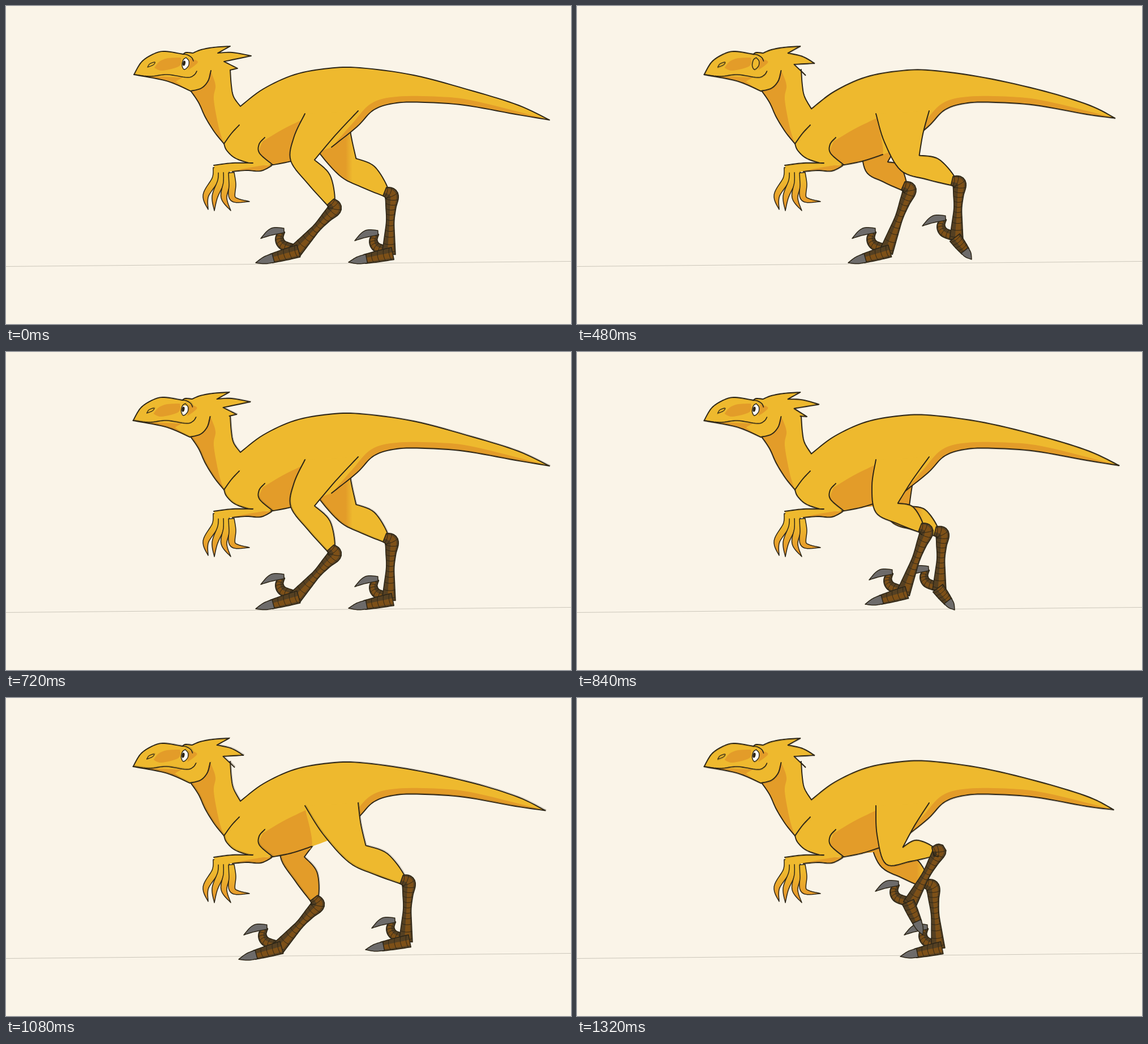
An HTML page with a canvas for the animation above (1.44 s loop, 998x561 px).

```html
<!DOCTYPE html>
<html lang="en">
<head>
<meta charset="utf-8">
<title>Walking raptor</title>
<style>
html, body { margin: 0; width: 100%; height: 100%; overflow: hidden; background: #faf4e8; }
canvas { display: block; width: 100vw; height: 100vh; }
</style>
</head>
<body>
<canvas id="stage" width="998" height="561"></canvas>
<script>
const ctx = document.getElementById('stage').getContext('2d');
const PAPER = '#faf4e8', SKIN = '#eeb92e', SHADE = '#e39c29', INK = '#2c2517';
const BARK = '#554022', RUST = '#7d5018', CLAW = '#6d6b6a';

let tick = 0;

const parse = s => s.trim().split(/\s+/).map(p => p.split(',').map(Number));
const mix = (a, b, t) => a.map((v, i) => v + (b[i] - v) * t);
const add = (a, b, k = 1) => [a[0] + b[0] * k, a[1] + b[1] * k];
const unit = (a, b) => {
  const d = add(b, a, -1), l = Math.hypot(...d) || 1;
  return [d[0] / l, d[1] / l];
};
const clamp = v => Math.max(0, Math.min(1, v));

// Catmull-Rom point between p[i] and p[i + 1].
function spline(p, i, t) {
  const a = p[i - 1] || p[i], b = p[i], c = p[i + 1], d = p[i + 2] || c;
  return b.map((v, n) => v + 0.5 * t * (c[n] - a[n] +
    t * (2 * a[n] - 5 * v + 4 * c[n] - d[n] + t * (3 * (v - c[n]) + d[n] - a[n]))));
}

function sample(p, steps = 8) {
  const out = [p[0]];
  for (let i = 0; i < p.length - 1; i++)
    for (let j = 1; j <= steps; j++) out.push(spline(p, i, j / steps));
  return out;
}

// Smooth runs joined by corners; in text a "|" marks the corner.
function curve(shape) {
  const runs = typeof shape === 'string' ? shape.split('|').map(parse) : shape;
  const path = new Path2D();
  let last;
  for (const run of runs) {
    const p = last ? [last, ...run] : run;
    sample(p).forEach(q => path.lineTo(...q));
    last = p[p.length - 1];
  }
  return path;
}

function paint(shape, color) {
  ctx.fillStyle = color;
  ctx.fill(curve(shape));
}

// Pen line plus a faint second pass that wanders from drawing to drawing.
function ink(shape, width = 1.9) {
  const path = curve(shape);
  ctx.strokeStyle = INK;
  ctx.lineWidth = width;
  ctx.stroke(path);
  if (!tick) return;
  ctx.save();
  ctx.globalAlpha = 0.4;
  ctx.lineWidth = 0.6;
  ctx.translate(1.6 * Math.sin(tick * 2.3), 1.6 * Math.cos(tick * 1.7));
  ctx.stroke(path);
  ctx.restore();
}

// Tapering limb along [x, y, radius] knots, optionally with scales.
function tube(knots, color, scaly) {
  const line = sample(knots);
  const dir = line.map((p, i) => unit(line[Math.max(0, i - 1)], line[Math.min(line.length - 1, i + 1)]));
  const side = (i, k) => add(line[i], [-dir[i][1], dir[i][0]], line[i][2] * k);
  const ribbon = (from, to) => {
    const path = new Path2D();
    line.forEach((p, i) => path.lineTo(...side(i, from)));
    for (let i = line.length - 1; i >= 0; i--) path.lineTo(...side(i, to));
    path.closePath();
    return path;
  };
  ctx.fillStyle = color;
  ctx.fill(ribbon(-1, 1));
  ctx.strokeStyle = INK;
  if (scaly) {
    ctx.fillStyle = RUST;
    ctx.fill(ribbon(-0.7, 0.2));
    ctx.lineWidth = 0.9;
    for (let i = 2; i < line.length - 1; i += 3) {
      ctx.beginPath();
      ctx.moveTo(...side(i, -1));
      ctx.quadraticCurveTo(...add(line[i], dir[i], 4), ...side(i, 1));
      ctx.stroke();
    }
  }
  ctx.lineWidth = 1.5;
  ctx.stroke(ribbon(-1, 1));
}

// One stride: knee, ankle, ball of the foot, toe tip.
const GAIT = [
  '503,273 582,355 510,434 441,453',
  '528,283 618,314 576,426 509,445',
  '553,287 658,324 668,434 601,448',
  '606,290 711,324 706,430 635,444',
  '572,290 675,311 670,412 697,447',
  '546,293 641,268 587,365 611,418'
].map(parse);

function shin(ankle, ball, toe, knee) {
  const along = (a, b, ...knots) => knots.map(([t, r]) => [...mix(a, b, t), r]);
  const root = add(ball, [-4, -6]);
  const curl = (...knots) => knots.map(([x, y, r]) => [...add(root, [x, y]), r]);
  const cuff = [...add(ankle, unit(ankle, knee), 13), 8];

  tube(curl([0, 0, 8], [-18, -7, 8], [-23, -19, 7], [-17, -31, 4]), BARK, true);
  tube(curl([-15, -32, 4], [-36, -30, 6], [-56, -18, 0]), CLAW);
  tube([cuff, ...along(ankle, ball, [0.02, 12], [0.22, 9], [0.45, 7], [0.7, 9], [1, 12])], BARK, true);
  tube(along(ball, toe, [-0.1, 11], [0.25, 10], [0.6, 8]), BARK, true);
  tube(along(ball, toe, [0.55, 8], [0.78, 6], [1, 0]), CLAW);
}

// Thigh and calf follow from hip, knee and ankle; the crook lies on the knee's bisector.
function leg(pose, far) {
  const row = GAIT[(pose + (far ? 3 : 0)) % 6];
  const [knee, ankle, ball, toe] = far
    ? row.map((p, i) => add(p, [i ? -30 : -18, 8])) : row;
  const hip = [far ? 554 : 572, 190];
  const up = unit(knee, hip), down = unit(knee, ankle);
  const crook = add(knee, unit([0, 0], add(up, down)), 42);
  const end = add(ankle, down, -10), n = [-down[1] * 8, down[0] * 8];
  const front = add(hip, [-44, 0]), rear = add(hip, [50, -5]);
  const low = add(end, n), high = add(end, n, -1);
  const shape = [
    [front, add(mix(front, knee, 0.5), [-7, 0]), knee, add(mix(knee, low, 0.5), n, 0.3), low],
    [high, add(mix(high, crook, 0.5), n, -1.6), crook],
    [add(mix(crook, rear, 0.5), [-2, 0]), rear]
  ];
  let color = SKIN;
  if (far) {
    color = ctx.createLinearGradient(600, 0, 612, 0);
    color.addColorStop(0, SHADE);
    color.addColorStop(1, SKIN);
  }
  paint(shape, color);
  ink(shape);
  shin(ankle, ball, toe, knee);
}

function torso(pose) {
  const sag = 5 * Math.sin(Math.PI * pose / 6);
  const tip = `${960 - 2.4 * pose},${201 - 0.8 * pose}`;
  const nape = `396,112 398,140 402,160 414,${177 + sag}`;
  const back = parse('455,146 510,121 570,110 625,109 720,122')
    .map(([x, y]) => `${x},${y + sag}`).join(' ') + ' 825,150 905,175 ' + tip;
  const under = '900,191 810,175 740,170 690,171 650,183 620,213 575,249';
  const belly = '540,262 503,274 467,281';
  const throat = '325,148 340,170 352,196 368,222 385,243';
  const chest = '385,243 390,255 406,269 436,279';

  paint(`${nape}|${back}|${under}|${belly}|${chest.split(' ').reverse().join(' ')}|368,222 352,196 340,170 325,148|345,110`, SKIN);
  paint(`${throat}|376,215 367,165 370,140 362,116`, SHADE);
  paint(`${tip} 830,168 765,160 690,160 645,172 612,207 577,247|620,213 650,183 690,171 740,170 810,175 900,191`, SHADE);
  paint('470,279 448,260 453,239|490,217 529,198|540,262 505,274', SHADE);
  ink(`${nape}|${back}|${under}`);
  [belly, throat, chest, '385,243 398,225 412,210', '457,232 447,244 448,260 471,280'].forEach(s => ink(s));
}

function arm() {
  const tone = ctx.createLinearGradient(0, 305, 0, 355);
  tone.addColorStop(0, SKIN);
  tone.addColorStop(1, '#e5952a');
  parse('357,359 368,361 397,361 430,345').forEach((tip, i) => tube([
    [371 + 9 * i, 285 + 3 * i, 5], [370 + 10 * i, 305 + 3 * i, 6],
    [353 + 16 * i, 334 + 2 * i, 5], [...tip, 0]
  ], tone));
  const top = '436,277 400,277 367,281', bottom = '400,292 425,290 450,291 469,282';
  paint(`${top}|371,294|${bottom}`, SKIN);
  paint('469,281 450,291 425,290 400,291|430,285 455,281', SHADE);
  ink(top);
  ink(bottom);
}

function eye() {
  const ball = '318,91 323,97 322,106 315,112 311,105 313,95 318,91';
  const open = clamp((Math.abs(tick - 3.7) - 0.7) / 2);
  paint(ball, '#fffdf6');
  ctx.save();
  ctx.clip(curve(ball));
  ctx.fillStyle = INK;
  ctx.beginPath();
  ctx.ellipse(314.5, 101, 2.4, 4.5, 0.2, 0, 7);
  ctx.fill();
  ctx.fillStyle = SKIN;
  ctx.fillRect(305, 90, 24, 23 * (1 - open));
  ctx.restore();
  ink(ball, 1.4);
}

function head(pose) {
  const d = clamp(pose / 3);
  const plume = `400,${82 + 7 * d} ${433 - 12 * d},${88 + 13 * d}`;
  const crest = `345,77 367,73 396,71|374,83|${plume}|385,${98 + 5 * d}|${409 - 4 * d},${110 + 12 * d}|396,113`;
  const skull = '226,121 240,98 262,84 281,80 313,85|318,82 330,83|' + crest;
  const jaw = '326,150 295,136 270,129 226,121';
  const cheek = '362,114 357,132 345,145 326,150';

  ctx.save();
  ctx.translate(tick ? -1.5 : 0, 0);
  paint(`${skull}|${cheek}|${jaw}`, SKIN);
  paint('230,122 260,124 312,126|300,133|318,147 295,136 270,129', SHADE);
  paint('262,109 271,98 286,92 309,91|306,106 276,114 262,109', SHADE);
  paint('325,92 339,99 322,113', SHADE);
  ink(skull);
  ink(jaw);
  ink(cheek);
  ink('228,121 255,124 285,121 320,126 332,122 337,115', 1.6);
  ink('250,108 254,102 263,99 260,104 250,108', 1.2);
  ink('313,85 320,86 328,91 331,97', 1.6);
  eye();
  ctx.restore();
}

function draw() {
  const pose = tick % 6;
  ctx.fillStyle = PAPER;
  ctx.fillRect(0, 0, 998, 561);
  ctx.lineCap = ctx.lineJoin = 'round';
  ctx.strokeStyle = '#cbc6ba';
  ctx.lineWidth = 1;
  ctx.beginPath();
  ctx.moveTo(0, 459.5);
  ctx.lineTo(998, 450.5);
  ctx.stroke();
  leg(pose, true);
  torso(pose);
  leg(pose, false);
  arm();
  head(pose);
}

let shown = -1;
function loop() {
  const t = performance.now() % 1440;
  tick = t < 80 ? 0 : t < 240 ? 1 : Math.floor(t / 120);
  if (tick !== shown) draw();
  shown = tick;
  requestAnimationFrame(loop);
}
loop();
</script>
</body>
</html>
```
